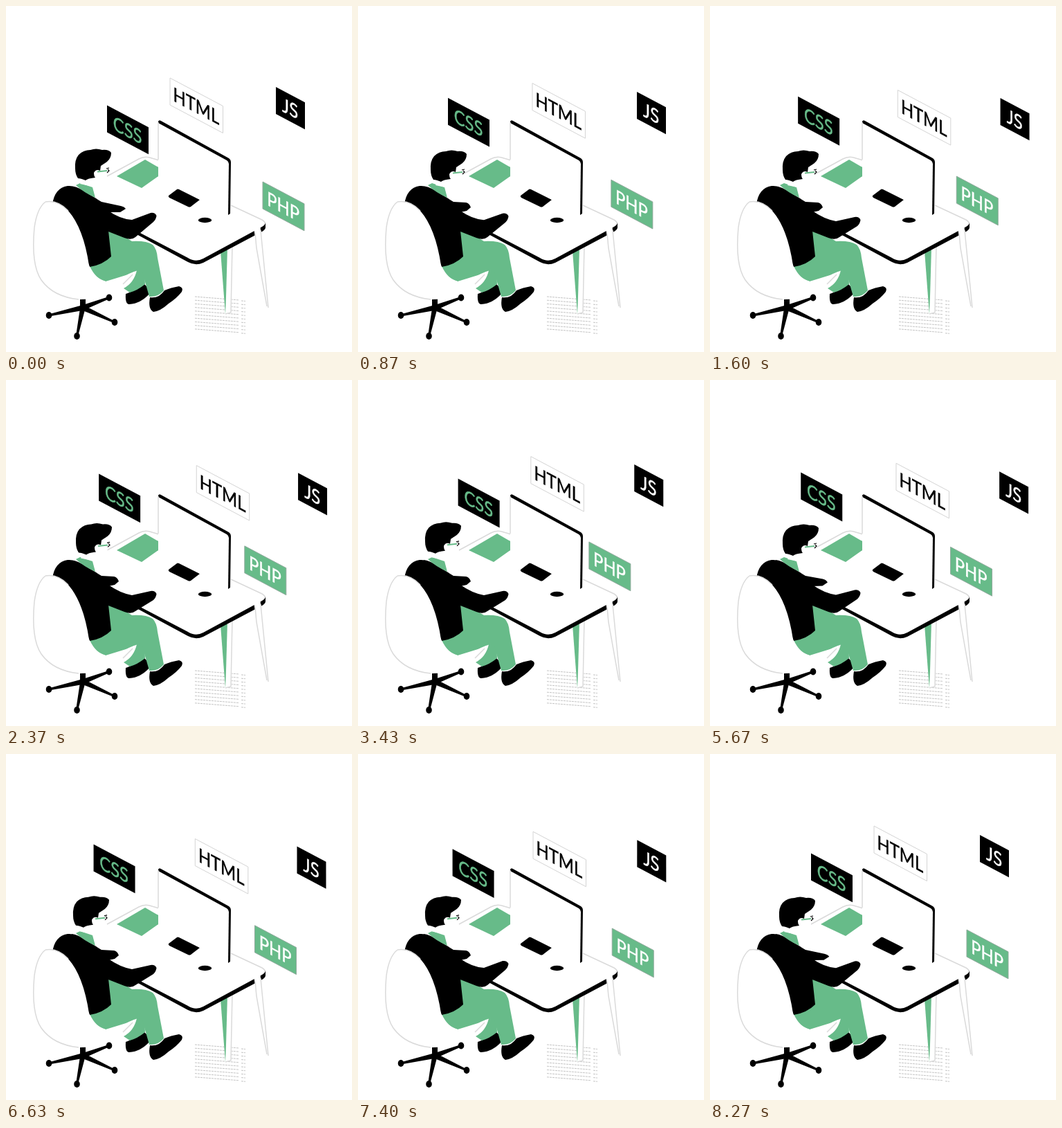
An HTML page for the animation above (8.31 s loop, 500 by 500 pixels).

```html
<!DOCTYPE html>
<html lang="en">
<head>
<meta charset="utf-8">
<title>Developer at a desk</title>
<style>
  html, body { margin: 0; width: 100%; height: 100%; overflow: hidden; background: #fff; }
  svg { display: block; width: 100vw; height: 100vh; }
  text { font: 28px Lato, "Open Sans", sans-serif; text-anchor: middle; stroke-width: .5; }
  .green { fill: #67bb89; }
  .white { fill: #fff; }
  .edge { fill: none; stroke: #dadada; stroke-width: 1.5; }
  .line { fill: none; stroke: #000; }
</style>
</head>
<body>
<svg viewBox="0 0 500 500">
  <g id="hatch" fill="none" stroke="#c4c4c4" stroke-dasharray="3 1"></g>

  <!-- desk -->
  <path class="white" d="M319 347L328 343L326 443L317 445Z"/>
  <path class="green" d="M310 354L320 349L318 420L317 445L315 420Z"/>
  <path class="edge" d="M327 345L325 443L317 445"/>
  <path class="white" d="M143 247L192 220Q201 216 211 220L370 308Q378 313 370 321L285 368Q274 373 264 367L140 300Z"/>
  <path class="edge" d="M146 246L192 221Q201 216 211 220L221 223M325 288L370 309Q375 312 375 316"/>
  <path d="M150 305L263 364Q274 371 285 365L370 319Q375 316 375 313V320Q375 323 370 326L285 371Q274 376 263 370L150 309Z"/>
  <path class="white" d="M358 321L367 314L379 434L376 435Z"/>
  <path class="edge" d="M360 328L362 350L377 434M368 324L379 436"/>
  <path class="green" d="M160 246L201 222L220 233V246L196 263Z"/>
  <path d="M235 274L247 265Q248 264 250 265L280 280L267 290Q265 291 263 290L236 277Q234 275 235 274Z"/>
  <ellipse cx="287.5" cy="309.5" rx="9.7" ry="3.7"/>

  <!-- monitor -->
  <path d="M220 167Q221 164 224 166L322 220Q325 222 325 226L324 300L321 302L220 243Z"/>
  <path class="white" d="M220 169L319 223Q322 225 322 228L321 303L220 246Z"/>
  <path class="edge" d="M220 168V222"/>
  <path class="green" d="M218 232L220 233V246L218 247Z"/>

  <g id="cards"></g>

  <!-- legs and shoes -->
  <path d="M173 416Q178 415 190 407L200 402Q207 408 208 415Q195 430 178 431Q172 431 173 416Z"/>
  <path class="green" d="M189 382L200 379L201 402Q190 411 179 414L170 408Q185 400 189 382Z"/>
  <path d="M208 421Q221 423 229 411Q238 407 250 405Q257 407 254 413Q246 423 235 430Q223 441 213 442Q205 438 208 421Z"/>
  <path class="green" d="M121 376L145 354L147 318L182 340Q203 339 212 345Q218 351 219 364L228 411Q220 421 207 420L196 381Q184 383 172 390Q155 399 144 398Q130 395 121 376Z"/>

  <!-- jacket -->
  <path id="leftArm"/>
  <path d="M67 287Q70 263 89 260Q100 259 112 267L130 278Q140 286 150 299L148 325L152 362Q140 374 121 377L95 310Z"/>
  <path id="rightArm"/>

  <!-- head -->
  <path class="green" d="M101 259L107 256L125 262L129 277Q113 270 101 259Z"/>
  <g id="head">
    <path class="white" d="M113 247L128 228L148 222L147 234L150 239L146 242L145 250Q138 254 130 251L126 261L107 257Z"/>
    <path d="M100 235Q99 222 105 215Q112 208 122 208Q130 205 139 208Q148 207 152 212Q152 220 146 225Q140 229 137 231L136 238Q130 235 127 241Q127 246 129 248Q118 249 115 252Q108 249 104 249Q100 243 100 235Z"/>
    <path class="line" stroke-width="1.2" d="M145 235L149 234M146 241L149 238L147 236"/>
    <path fill="none" stroke="#67bb89" stroke-width="2" d="M132 239.5L146 238"/>
  </g>

  <!-- chair -->
  <path class="line" stroke-width="8" d="M111 422V440"/>
  <g id="base"></g>
  <path class="white" d="M55 284Q73 279 90 296Q112 321 120 375Q124 391 144 398L183 386Q174 401 153 410Q131 425 105 424Q66 419 49 394Q39 375 40 333Q42 298 55 284Z"/>
  <path class="edge" d="M57 283Q45 292 41 320Q36 374 51 396Q68 420 105 424M57 283Q75 280 90 296M183 388L169 402"/>
</svg>
<script>
const LOOP = 8310, SLOPE = 0.53, GREEN = '#67bb89';
const byId = id => document.getElementById(id);

function add(parent, tag, attrs, text) {
  const el = document.createElementNS('http://www.w3.org/2000/svg', tag);
  for (const key in attrs) el.setAttribute(key, attrs[key]);
  if (text) el.textContent = text;
  return parent.appendChild(el);
}

// Eased travel between [seconds, value] keys.
function track(keys, t) {
  for (let i = 1; i < keys.length; i++) {
    const [t0, a] = keys[i - 1], [t1, b] = keys[i];
    if (t <= t1) {
      const s = (t - t0) / (t1 - t0);
      return a + (b - a) * s * s * (3 - 2 * s);
    }
  }
  return keys[keys.length - 1][1];
}

const cards = [
  { label: 'HTML', x: 237, y: 104, w: 76.5, fill: '#fff', ink: '#000', edge: '#d4d4d4', rise: 0.51,
    keys: [[0, 0], [2.1, 40], [4.24, 0], [6.25, 40], [8.28, 0]] },
  { label: 'JS', x: 390, y: 117, w: 42, fill: '#000', ink: '#fff', edge: 'none', rise: 0.54,
    keys: [[0, 0], [2.07, 34], [4.14, 0], [6.22, 34], [8.28, 0]] },
  { label: 'CSS', x: 146, y: 143.5, w: 60, fill: '#000', ink: GREEN, edge: 'none', rise: 0.67,
    keys: [[0, 0], [1.22, -20], [3.85, 0], [4.13, 0], [6.45, -20], [8.28, 0]] },
  { label: 'PHP', x: 371, y: 254, w: 60, fill: GREEN, ink: '#fff', edge: '#8fa99b', rise: 0.54,
    keys: [[0, 0], [3.77, -38], [8.28, 0]] }
];
const headKeys = [[0, 0], [0.7, 5], [1.75, 5], [3, -3], [4.23, -3],
  [4.75, 5], [5.95, 5], [6.6, -3], [7.5, -3], [8.28, 0]];

for (const card of cards) {
  card.node = add(byId('cards'), 'g', {});
  const drop = card.w * SLOPE;
  add(card.node, 'path', {
    d: `M0 0L${card.w} ${drop}V${drop + 39}L0 39Z`, fill: card.fill, stroke: card.edge
  });
  add(card.node, 'text', {
    transform: `matrix(.85 ${0.85 * SLOPE} 0 1 ${card.w / 2 - 0.4} ${drop / 2 + 30})`,
    fill: card.ink, stroke: card.ink
  }, card.label);
}

for (let i = 0; i < 10; i++) {
  const y = 420 + i * 5.2;
  add(byId('hatch'), 'path', { d: `M273 ${y}L337 ${y + 5}M340 ${y + 6}L346 ${y + 6.5}` });
}

// Tapered chair feet from the hub, each ending in a castor.
for (const [cx, cy] of [[62, 447], [149, 421.5], [157, 457], [102.5, 477]]) {
  const hub = { x: 111, y: 436 }, angle = Math.atan2(cy - hub.y, cx - hub.x);
  const corner = (x, y, r) => `${x - r * Math.sin(angle)} ${y + r * Math.cos(angle)}`;
  add(byId('base'), 'path', {
    d: `M${corner(hub.x, hub.y, 3.8)}L${corner(cx, cy, 1.5)}L${corner(cx, cy, -1.5)}L${corner(hub.x, hub.y, -3.8)}Z`
  });
  add(byId('base'), 'ellipse', { cx, cy, rx: 4.3, ry: 5 });
}

function draw(ms) {
  const t = ms / 1000, turn = 2 * Math.PI * ms / LOOP;
  for (const { node, x, y, rise, keys } of cards) {
    const d = track(keys, t);
    node.setAttribute('transform', `translate(${x + d} ${y + d * rise})`);
  }
  const h = track(headKeys, t);
  byId('head').setAttribute('transform', `translate(${h} ${h * 0.4})`);

  const reach = Math.max(0, Math.cos(13 * turn)) * 10;
  byId('leftArm').setAttribute('d',
    `M128 277L138 283L${156 + reach} ${284 + reach * 0.5}Q${161 + reach} ${285 + reach * 0.5} ${163 + reach} ${291 + reach * 0.2}L${157 + reach * 0.8} ${296 + reach * 0.2}L148 298Z`);

  const lift = Math.max(0, Math.cos(9 * turn) - 0.5) * 12;
  const tip = 305 - lift;
  byId('rightArm').setAttribute('d',
    `M115 285L148 296Q165 308 182 ${311 - lift / 3}L209 ${tip}Q215 ${tip - 1} 217.5 ${tip + 4}Q217 ${tip + 9} 213 ${tip + 13}L187 334Q181 339 171 335L148 326Z`);
}

const start = performance.now();
function frame() {
  draw((performance.now() - start) % LOOP);
  requestAnimationFrame(frame);
}
frame();
</script>
</body>
</html>
```
